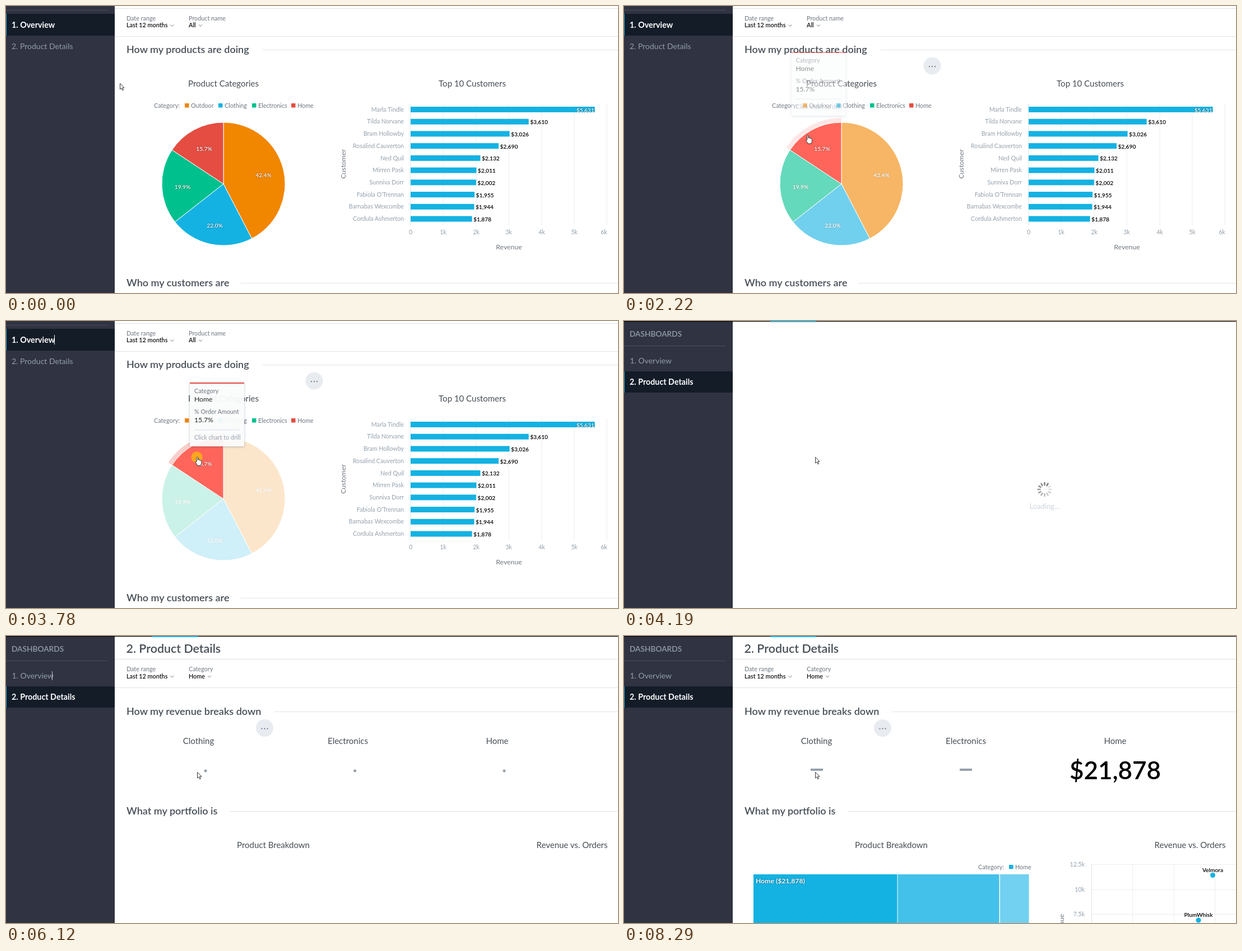
Write an HTML page that moves like this. It is 1092x513 px and loops after 8.82 s.

```html
<!DOCTYPE html>
<html lang="en">
<head>
<meta charset="utf-8">
<title>Dashboard drill</title>
<style>
html, body { margin: 0; width: 100%; height: 100%; overflow: hidden; background: #fff; }
svg { display: block; width: 1092px; height: 513px; font-family: Lato, "Open Sans", sans-serif; }
text { white-space: pre; }
.nav { font-size: 14px; fill: #929eac; }
.on { font-size: 14.3px; font-weight: 700; fill: #fff; }
.dash { font-size: 13.7px; font-weight: 600; fill: #929eac; }
.big { font-size: 21.4px; font-weight: 600; fill: #464e56; }
.sec { font-size: 18px; font-weight: 600; fill: #464e56; }
.head { font-size: 15px; fill: #464e56; }
.label { font-size: 10.8px; fill: #6d7680; }
.pick { font-size: 10.8px; font-weight: 600; fill: #111; }
.soft { font-size: 10.7px; fill: #94a1ad; }
.axis { font-size: 12.3px; fill: #6d7680; }
.val { font-size: 10.2px; font-weight: 600; fill: #000; }
.lit { fill: #fff; filter: drop-shadow(0 0 1px rgba(0,0,0,.55)); }
.tip { font-size: 12.2px; fill: #222; }
.kpi { font-size: 43.9px; font-weight: 600; fill: #000; }
.tree { font-size: 12.2px; font-weight: 700; }
.load { font-size: 13px; fill: #cbd4de; }
.m { text-anchor: middle; }
.e { text-anchor: end; }
#tip { filter: drop-shadow(0 1px 2px rgba(20,56,93,.3)); }
</style>
</head>
<body>
<svg viewBox="0 0 1092 513" id="stage"></svg>
<script>
const LOOP = 8820, BLUE = '#14b2e2', RULE = '#dfe3e8', GRID = '#ebedf0';

const text = (x, y, s, cls, more = '') => `<text x="${x}" y="${y}" class="${cls}" ${more}>${s}</text>`;
const rect = (x, y, w, h, fill, more = '') =>
  `<rect x="${x}" y="${y}" width="${w}" height="${h}" fill="${fill}" ${more}/>`;
const dot = (x, y, r, fill, more = '') => `<circle cx="${x}" cy="${y}" r="${r}" fill="${fill}" ${more}/>`;
const group = (id, body, more = '') => `<g id="${id}" ${more}>${body}</g>`;
const chevron = (x, y) =>
  `<path d="M${x - 3} ${y - 1.5}l3 3 3-3" fill="none" stroke="#94a1ad" stroke-width="1.1"/>`;
const section = (y, s, from) => text(215, y + 6, s, 'sec') + rect(from, y, 1092 - from, 1, RULE);
const filter = (x, y, name, value, arrow) =>
  text(x, y, name, 'label') + text(x, y + 12.7, value, 'pick') + chevron(arrow, y + 9.3);
const menu = (x, y) => dot(x, y, 15.5, '#e8ecf1') + [-5, 0, 5].map(d => dot(x + d, y + 1.2, 1.1, '#6d7680')).join('');

// Pie: name, share, colour, legend x, label position
const PIE = [
  ['Outdoor', .424, '#f18600', 319, 459.5, 306],
  ['Clothing', .22, BLUE, 379, 372.5, 396],
  ['Electronics', .199, '#00c18e', 439, 315, 327],
  ['Home', .157, '#e54d42', 509, 353.5, 258.5]
];
const onCircle = (share, r) => {
  const a = share * 2 * Math.PI;
  return `${(388 + r * Math.sin(a)).toFixed(2)} ${(318 - r * Math.cos(a)).toFixed(2)}`;
};
const slice = (from, to, r) => `M388 318L${onCircle(from, r)}A${r} ${r} 0 0 1 ${onCircle(to, r)}Z`;

function pie() {
  let from = 0, rest = '', home = '', legend = text(264, 181.5, 'Category:', 'label');
  for (const [name, share, fill, lx, x, y] of PIE) {
    const last = name === 'Home';
    const part = `<path ${last ? 'id="home"' : ''} d="${slice(from, from + share, 110)}" fill="${fill}" stroke="#fff"/>` +
      text(x, y, (share * 100).toFixed(1) + '%', 'val lit m');
    if (last) home = part; else rest += part;
    legend += rect(lx, 174, 7.5, 7.5, fill) + text(lx + 11, 181.5, name, 'label');
    from += share;
  }
  const halo = `<path id="halo" d="${slice(1 - .157, 1, 118)}" fill="#e54d42"/>`;
  const under = `<path d="${slice(1 - .157, 1, 110)}" fill="#fff"/>`;
  return text(388, 143.5, 'Product Categories', 'head m') + legend + halo + under + group('rest', rest) + home;
}

const CUSTOMERS = [
  ['Marla Tindle', 5631], ['Tilda Norvane', 3610], ['Bram Hollowby', 3026],
  ['Rosalind Cauverton', 2690], ['Ned Quil', 2132], ['Mirren Pask', 2011],
  ['Sunniva Dorr', 2002], ['Fabiola O\u2019Trennan', 1955],
  ['Barnabas Wexcombe', 1944], ['Cordula Ashmerton', 1878]
];
function bars() {
  let s = text(832, 143.5, 'Top 10 Customers', 'head m');
  for (let k = 0; k <= 6; k++) {
    const x = Math.round(722 + k * 58.4);
    s += rect(x - .5, 174, 1, 218, k ? GRID : RULE);
    s += text(k === 6 ? 1067 : x, 408, k ? k + 'k' : '0', 'soft m');
  }
  CUSTOMERS.forEach(([name, v], i) => {
    const y = 185 + i * 21.72, w = v * .05835, money = '$' + v.toLocaleString('en-US');
    s += rect(722, y - 5, w, 10, BLUE) + text(710, y + 3.7, name, 'soft e');
    s += i ? text(722 + w + 2.5, y + 4.6, money, 'val') : text(722 + w - 1, y + 4.6, money, 'val lit e');
  });
  return s + text(897.5, 435.3, 'Revenue', 'axis m') +
    text(0, 0, 'Customer', 'axis m', 'transform="translate(606 282.5) rotate(-90)"');
}

const overview = () =>
  rect(0, 0, 194, 513, '#303341') + rect(0, 7, 182, 1, '#4a4e5c') +
  rect(0, 14, 194, 39, '#141c28') + rect(0, 14, 1, 39, BLUE) +
  text(10, 38.5, '1. Overview', 'on') + text(10, 77, '2. Product Details', 'nav') +
  rect(194, 4, 898, 1, RULE) + rect(194, 54, 898, 1, RULE) +
  filter(215, 25.5, 'Date range', 'Last 12 months', 296.5) +
  filter(326, 25.5, 'Product name', 'All', 347) +
  section(78, 'How my products are doing', 458) + section(495, 'Who my customers are', 418) +
  pie() + bars() + group('menu1', menu(550, 107)) +
  group('caret1', rect(86, 25, 1, 17, '#fff')) +
  group('tip',
    rect(0, 0, 97, 114, '#fff', 'rx="2" fill-opacity=".93"') + rect(0, 0, 97, 2, '#e54d42') +
    text(8, 19.3, 'Category', 'label') + text(8, 34, 'Home', 'tip') +
    text(8, 56.3, '% Order Amount', 'label') + text(8, 71.3, '15.7%', 'tip') +
    rect(8, 84, 80, 1, '#d9e2ec') + text(8, 102.3, 'Click chart to drill', 'soft'));

function spinner() {
  let s = '';
  for (let i = 0; i < 12; i++)
    s += `<path d="M0 -8V-12" stroke="#5f6266" stroke-width="2.6" stroke-linecap="round"
      transform="rotate(${-30 * i})" opacity="${(.85 - i * .062).toFixed(2)}"/>`;
  return group('spokes', s) + text(750.5, 336, 'Loading\u2026', 'load m');
}

const CELLS = [['Clothing', 343.5], ['Electronics', 610], ['Home', 876.5]];
const dots = cx => [-12.5, 0, 12.5].map((d, i) => dot(cx + d, 241, 2.5, '#94a1ad', `class="d${i}"`)).join('');

const treemap = () =>
  text(632, 416.5, 'Category:', 'label') + rect(687, 409, 7.5, 7.5, BLUE) + text(698, 416.5, 'Home', 'label') +
  rect(231, 426, 256.5, 87, BLUE) + rect(488.5, 426, 181, 87, '#44c1ea') + rect(671, 426, 51.5, 87, '#72d0f0') +
  text(235, 442, 'Home ($21,878)', 'tree lit');

function scatter() {
  let s = '';
  [['12.5k', 408], ['10k', 453], ['7.5k', 497]].forEach(([v, y]) =>
    s += rect(834, y, 258, 1, GRID) + text(822, y + 4, v, 'soft e'));
  [834, 907, 981, 1054].forEach((x, i) => s += rect(x, 408, 1, 105, i ? GRID : RULE));
  [['Velmora', 1050.5, 427.5], ['PlumWhisk', 1025, 508]].forEach(([v, x, y]) =>
    s += dot(x, y, 4.5, BLUE) + text(x, y - 6, v, 'val m'));
  return s + text(0, 0, 'Revenue', 'axis e', 'transform="translate(785 497) rotate(-90)"');
}

const details = () =>
  rect(0, 0, 194, 513, '#303341') + rect(0, 0, 1092, 1.3, '#0a0a0c') + rect(194, 1.3, 898, 1, '#d6d8da') +
  rect(261, 0, 82, 1.8, BLUE) + rect(0, 44, 181, 1, '#4a4e5c') +
  text(10, 27.5, 'DASHBOARDS', 'dash') + text(10.5, 76, '1. Overview', 'nav') +
  rect(0, 90, 194, 38, '#141c28') + rect(0, 90, 1, 38, BLUE) + text(10, 114, '2. Product Details', 'on') +
  group('caret2', rect(82, 63, 1, 16, '#c3cad3')) +
  group('loading', spinner()) +
  group('body',
    text(214.5, 29.5, '2. Product Details', 'big') +
    rect(194, 41, 898, 1, RULE) + rect(194, 92, 898, 1, RULE) +
    filter(215, 63, 'Date range', 'Last 12 months', 296.5) + filter(326, 63, 'Category', 'Home', 363) +
    section(135, 'How my revenue breaks down', 478) + section(313, 'What my portfolio is', 399) +
    CELLS.map(([name, x]) => text(x, 193, name, 'head m')).join('') +
    text(477, 378.5, 'Product Breakdown', 'head m') + text(1010, 378.5, 'Revenue vs. Orders', 'head m') +
    menu(461.5, 164.5) +
    group('wait', dots(343.5) + dots(610)) + group('waitHome', dots(876.5)) +
    group('none', rect(333, 237, 22, 4, '#94a1ad') + rect(599, 237, 22, 4, '#94a1ad')) +
    group('kpi', text(876.5, 256, '$21,878', 'kpi m')) +
    group('tree', treemap()) + group('plot', scatter()));

const pointer =
  group('click', dot(340.5, 243.5, 10, '#fbaa1d', 'fill-opacity=".95"')) +
  group('mouse',
    group('arrow', '<path d="M.5 .5V11L3 8.8 4.8 12.8 6.5 12 4.7 8.2H8Z" fill="#fff" stroke="#222" stroke-width=".9"/>') +
    group('hand', '<path d="M-.9 1.2C-.9-.3 1.3-.3 1.4 1.2V5.6C2-.1 3.6 4.6 3.7 6 4.3 5 5.7 5.2 5.8 6.6 6.6 5.8 7.7 6.2 7.7 7.6V10.6C7.7 13 6.6 13.3 6.4 15.4H.3C.1 13.4-2.2 11.4-2.9 9.1-3.2 7.9-1.8 7.5-.9 9Z" fill="#fff" stroke="#222" stroke-width=".9" stroke-linejoin="round"/>'));

const stage = document.getElementById('stage');
stage.innerHTML = group('page1', overview()) + group('page2', details()) + pointer;
const el = {};
stage.querySelectorAll('[id]').forEach(n => el[n.id] = n);
const pulses = [0, 1, 2].map(i => stage.querySelectorAll('.d' + i));

const show = (id, on) => el[id].style.display = on ? '' : 'none';
const fade = (id, a) => el[id].setAttribute('opacity', a.toFixed(3));
const move = (id, x, y) => el[id].setAttribute('transform', `translate(${x.toFixed(2)} ${y.toFixed(2)})`);
const clamp = v => Math.max(0, Math.min(1, v));
const blink = (t, start, half) => t >= start && Math.floor((t - start) / half) % 2 === 0;

// Pointer route: time, x, y
const ROUTE = [[1590, 203, 138], [1800, 256, 172], [2010, 301, 205], [2150, 322, 225], [2360, 339, 242], [2500, 341, 243]];
function route(t) {
  if (t <= ROUTE[0][0]) return ROUTE[0].slice(1);
  for (let i = 1; i < ROUTE.length; i++) {
    const [t0, x0, y0] = ROUTE[i - 1], [t1, x1, y1] = ROUTE[i];
    if (t < t1) {
      const k = (t - t0) / (t1 - t0);
      return [x0 + (x1 - x0) * k, y0 + (y1 - y0) * k];
    }
  }
  return ROUTE[ROUTE.length - 1].slice(1);
}

// The screen refreshes in 70 ms ticks counted from each burst of activity.
function tick(t) {
  const from = t < 3980 ? 1660 : t < 5770 ? 3980 : 5770;
  return from + Math.floor((t - from) / 70) * 70;
}

function render(t) {
  const q = tick(t), first = t < 3980;
  show('page1', first);
  show('page2', !first);

  const [x, y] = route(q), hover = first && q >= 2220;
  move('mouse', x, y);
  show('arrow', !hover);
  show('hand', hover);
  show('click', t >= 3780 && first);

  if (first) {
    const k = clamp((q - 2150) / 140), [tx, ty] = route(q - 140);
    show('caret1', blink(t, 270, 528));
    show('menu1', q >= 1730);
    fade('rest', 1 - .8 * k);
    fade('halo', .27 * k);
    el.home.setAttribute('fill', hover ? '#ff655a' : '#e54d42');
    show('tip', hover);
    fade('tip', k);
    move('tip', tx - 13, ty - 133);
    return;
  }

  show('caret2', blink(t, 4580, 530));
  show('loading', q >= 4050 && t < 4870);
  const turn = Math.floor((Math.min(q, 4740) - 4190) / 70) * 30 + 30;
  el.spokes.setAttribute('transform', `translate(750.5 301) rotate(${turn})`);
  show('body', t >= 4870);
  show('wait', t < 6750);
  show('none', t >= 6750);
  show('waitHome', t < 6540);
  show('kpi', t >= 6540);
  show('tree', t >= 7080);
  show('plot', t >= 7280);
  pulses.forEach((set, i) => {
    const p = (((q - 6120 + (2 - i) * 210 + 315) % 630) + 630) % 630 - 315;
    const a = clamp(1 - Math.abs(p) / 190);
    set.forEach(n => n.setAttribute('opacity', a.toFixed(3)));
  });
}

const start = performance.now();
function loop() {
  render((performance.now() - start) % LOOP);
  requestAnimationFrame(loop);
}
loop();
</script>
</body>
</html>
```
